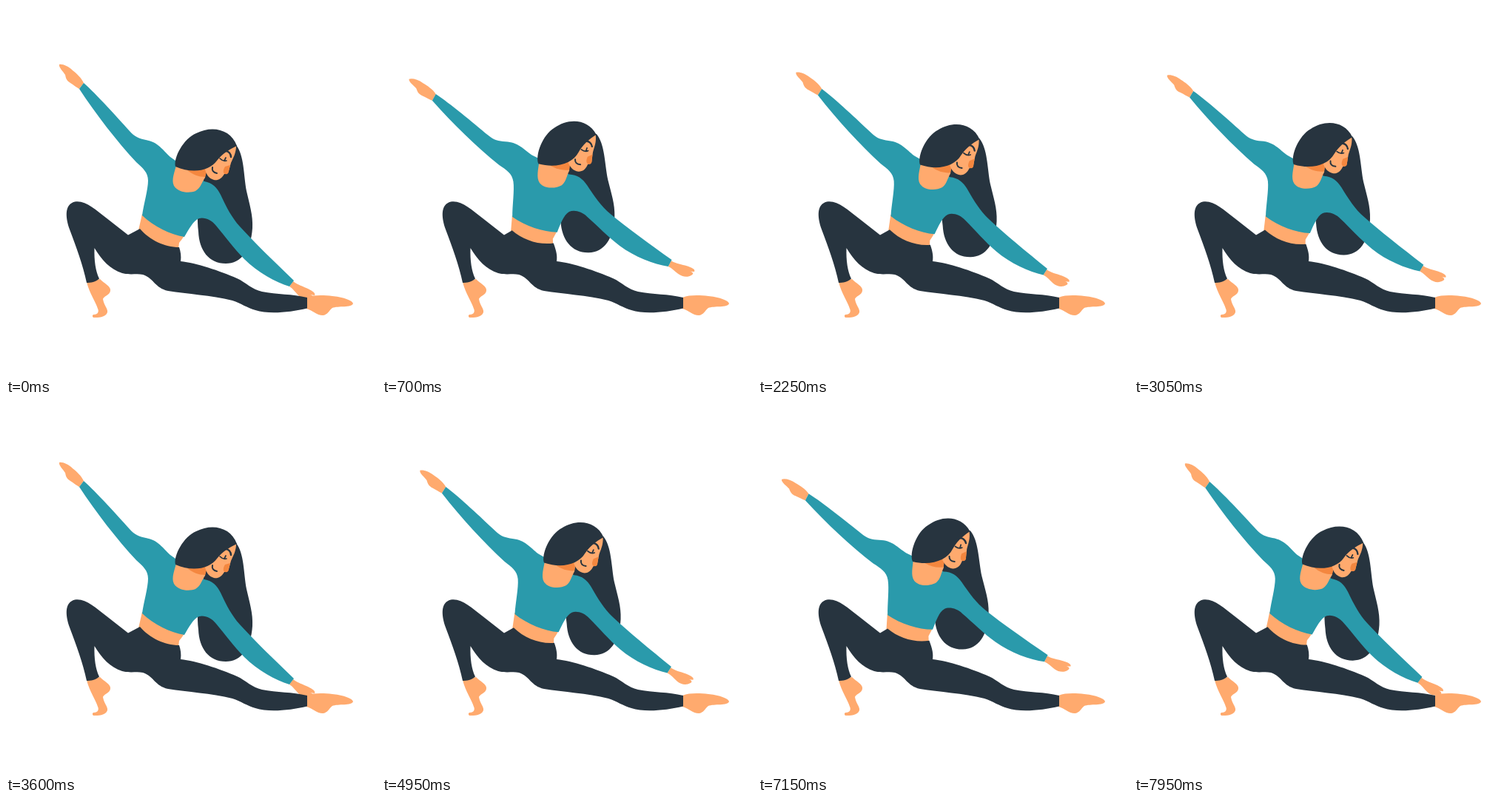
An HTML page with a canvas that plays this animation: 500x500 px, repeating every 8 s.

```html
<!DOCTYPE html>
<html lang="en">
<head>
<meta charset="utf-8">
<title>Stretch</title>
<style>
  html, body { margin: 0; width: 100%; height: 100%; overflow: hidden; background: #fff; }
  canvas { display: block; width: 100%; height: 100%; }
</style>
</head>
<body>
<canvas id="stage" width="500" height="500"></canvas>
<script>
const ctx = document.getElementById('stage').getContext('2d');

const TEAL = '#2a9aab', DARK = '#27343f', SKIN = '#ffaa6e', SHADE = '#f4873f';
const LOOP = 8000, STEP = 50;
const CYCLE = 4500, MOVING = 3600, HALF_SWAY = 900;
const HIP = { x: 194, y: 339 };
const HAIR_ROOT = { x: 310, y: 200 };
const LEAN = -9.3 * Math.PI / 180;
const HAIR_LAG = 0.15;

const shape = d => new Path2D(d);

const backHair = shape(`M311 188 C322 202 321 228 325 250 C329 268 334 283 333 300
  C331 330 318 348 297 348 C274 348 261 330 260 305 C258 288 259 270 262 250 L270 225 L290 190 Z`);
const leftHand = shape(`M105 104 C102 97 95 91 90 87 C84 81 76 78 72 79 C71 83 77 88 80 93
  C81 98 82 101 87 104 C92 107 95 110 99 112 Z`);
const rightHand = shape(`M388 372 C394 377 402 379 408 382 C414 385 419 388 417 391 L411 390
  C415 391 416 394 413 395 C407 398 400 396 395 391 C391 387 388 382 383 379 Z`);
const waist = shape(`M184 281 L179 303 C194 321 214 330 233 328 L234 320 C236 317 239 314 241 310 Z`);
const top_ = shape(`M105 104 C122 119 150 150 167 169 C174 177 180 179 189 181
  C206 184 212 195 222 204 L229 209 L268 237 C279 239 285 245 290 255 C298 272 305 286 316 298
  C335 319 362 345 389 371 L383 379 C364 373 340 360 322 342 C308 328 296 311 284 297
  C278 289 268 285 261 287 C253 290 247 302 241 312 C222 309 200 298 184 283
  C186 268 192 248 192 236 C192 225 185 219 176 211 C150 183 122 147 99 112 Z`);
const neck = shape(`M231 212 C228 224 223 235 227 243 C233 253 249 253 256 250
  C263 246 264 239 269 232 L272 215 Z`);
const neckShade = shape('M244 221 C252 228 261 231 269 231 L274 215 Z');
const face = shape(`M311 189 C311 199 307 205 304 212 L301 223 C300 227 297 227 295 227
  C291 234 286 236 281 235 C274 233 271 228 269 221 L285 200 Z`);
const nose = shape('M296 217 C293 222 293 226 296 227 C299 228 301 226 301 223 L303 215 Z');
const frontHair = shape(`M229 217 C226 205 240 179 257 172 C278 161 304 166 312 189
  C301 194 292 200 285 209 C275 223 252 227 229 217 Z`);
const brow = shape('M297 196 C301 196 304 200 304 204');
const eye = shape('M289 206 C292 209 295 210 298 209 M295 209 L297 205');
const mouth = shape('M279 218 C278 222 280 225 285 226');
const backFoot = shape(`M109 373 L127 369 C132 375 142 378 141 385 C140 391 132 392 131 396
  C132 404 138 409 137 414 C135 421 124 421 118 421 C116 419 117 417 119 417
  C124 417 126 413 124 409 C121 399 113 389 109 373 Z`);
const frontFoot = shape(`M406 394 C416 390 430 391 441 392 C452 393 468 397 469 402
  C468 408 448 405 441 408 C437 411 434 418 428 418 C420 418 414 411 406 409 Z`);

function fill(path, color) {
  ctx.fillStyle = color;
  ctx.fill(path);
}

function stroke(path, width) {
  ctx.strokeStyle = DARK;
  ctx.lineWidth = width;
  ctx.lineCap = 'round';
  ctx.stroke(path);
}

function aroundHip(x, y, angle) {
  const c = Math.cos(angle), s = Math.sin(angle);
  const dx = x - HIP.x, dy = y - HIP.y;
  return [HIP.x + dx * c - dy * s, HIP.y + dx * s + dy * c];
}

function rotated(pivot, angle, draw) {
  ctx.save();
  ctx.translate(pivot.x, pivot.y);
  ctx.rotate(angle);
  ctx.translate(-pivot.x, -pivot.y);
  draw();
  ctx.restore();
}

// The waistband follows the torso while the legs stay planted.
function leggings(angle) {
  const at = (x, y) => aroundHip(x, y, angle).map(v => v.toFixed(2)).join(' ');
  return shape(`M109 374 C104 350 95 326 86 302 C80 285 79 268 93 264.5
    C107 262 121 275 135 286 L165 309.5 L${at(181, 301)}
    C${at(194, 316)} ${at(214, 326)} ${at(234, 326)} C236 332 237 338 236 345
    C257 347 289 358 312 368 C325 374 332 383 346 386 C366 390 387 389 407 394
    L407 408.5 C384 414 355 417 337 411 C326 408 318 402 306 398 C277 391 245 389 219 385
    C201 381 200 368 185 363 C176 361 169 364 157 361 C141 356 129 343 119.5 327
    C119 344 121 358 126 368.5 C121 373 115 374 109 374 Z`);
}

function lean(time) {
  const u = Math.min(time % CYCLE, MOVING) / HALF_SWAY % 2;
  const p = u < 1 ? u : 2 - u;
  return LEAN * p * p * (3 - 2 * p);
}

function drawBackHair(angle) {
  const [x, y] = aroundHip(HAIR_ROOT.x, HAIR_ROOT.y, angle);
  ctx.save();
  ctx.translate(x - HAIR_ROOT.x, y - HAIR_ROOT.y);
  rotated(HAIR_ROOT, angle * HAIR_LAG, () => fill(backHair, DARK));
  ctx.restore();
}

function drawUpperBody() {
  fill(leftHand, SKIN);
  fill(rightHand, SKIN);
  fill(waist, SKIN);
  fill(top_, TEAL);
  fill(neck, SKIN);
  fill(neckShade, SHADE);
  fill(face, SKIN);
  fill(nose, SHADE);
  fill(frontHair, DARK);
  stroke(brow, 2.4);
  stroke(eye, 1.7);
  stroke(mouth, 2);
}

function render(time) {
  const angle = lean(time);
  ctx.fillStyle = '#fff';
  ctx.fillRect(0, 0, 500, 500);
  drawBackHair(angle);
  rotated(HIP, angle, drawUpperBody);
  fill(backFoot, SKIN);
  fill(frontFoot, SKIN);
  fill(leggings(angle), DARK);
}

const start = performance.now();
function tick() {
  const time = (performance.now() - start) % LOOP;
  render(Math.floor(time / STEP) * STEP);
  requestAnimationFrame(tick);
}
tick();
</script>
</body>
</html>
```
